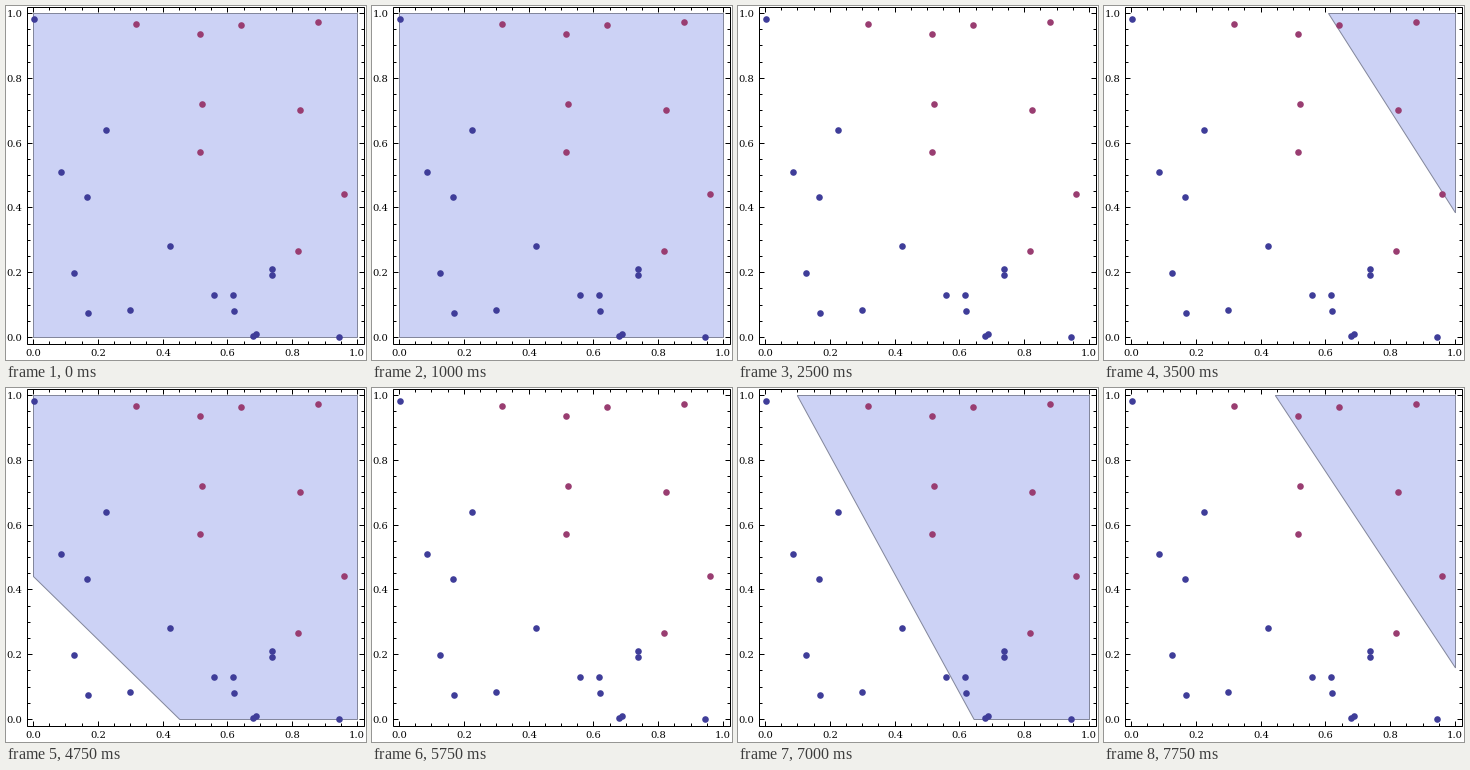
A matplotlib script that plays this animation: 360x354 px, repeating every 8000 ms.

```python
import numpy as np
import matplotlib.pyplot as plt
from matplotlib.animation import FuncAnimation
from matplotlib.patches import Polygon, Rectangle

W, H, DPI = 360, 354, 100
PX = 72 / DPI  # one pixel in points
X0, Y0, UNIT = 27.5, 331.5, 324
LEFT, TOP, RIGHT, BOTTOM = 21.5, 1.5, 358.5, 338.5

BLUE, RED = "#3f3d99", "#993d71"
FILL, EDGE = "#ccd2f5", "#83879c"

RED_POINTS = dict(
    a=(.315, .969), b=(.5154, .9353), c=(.639, .966), d=(.8796, .9723),
    e=(.5216, .7196), f=(.821, .7011), g=(.5154, .5716), h=(.9568, .4422),
    i=(.8179, .2666))
BLUE_POINTS = dict(
    A=(0, .9815), C=(.2253, .6394), D=(.0864, .51), E=(.1636, .433),
    F=(.1235, .1988), G=(.1667, .0755), H=(.2963, .0847), I=(.4228, .282),
    J=(.5586, .131), K=(.6142, .131), L=(.7346, .2111), M=(.7346, .1926),
    N=(.6852, .0108), O=(.679, .0046), P=(.9444, .0015), Q=(.6173, .0817))

# misclassified point that corrects the perceptron at each step
PICKS = "MbAdJfIgQAdChIbAePgCgAPbAbAgLhK"
START = np.array([.02, 0, 0])


def to_px(x, y):
    return X0 + UNIT * np.asarray(x), Y0 - UNIT * np.asarray(y)


def train():
    """Weights (wx, wy, bias) before and after every correction."""
    history = [START]
    for name in PICKS:
        if name in RED_POINTS:
            step = np.array([*RED_POINTS[name], 1])
        else:
            step = -np.array([*BLUE_POINTS[name], 1])
        history.append(history[-1] + step)
    return history


def positive_region(w):
    """Part of the unit square where wx*x + wy*y + bias >= 0."""
    square = np.array([(0, 0), (1, 0), (1, 1), (0, 1)], float)
    region = []
    for p, q in zip(square, np.roll(square, -1, axis=0)):
        fp, fq = w[:2] @ p + w[2], w[:2] @ q + w[2]
        if fp >= 0:
            region.append(p)
        if fp * fq < 0:
            region.append(p + (q - p) * fp / (fp - fq))
    return np.array(region)


fig = plt.figure(figsize=(W / DPI, H / DPI), dpi=DPI, facecolor="white")
ax = fig.add_axes([0, 0, 1, 1])
ax.set_xlim(0, W)
ax.set_ylim(H, 0)
ax.axis("off")


def line(xs, ys):
    ax.plot(xs, ys, color="black", lw=PX, solid_capstyle="butt", snap=False,
            zorder=3)


def draw_frame():
    ax.add_patch(Rectangle((LEFT, TOP), RIGHT - LEFT, BOTTOM - TOP, fill=False,
                           ec="black", lw=PX, snap=False, zorder=3))
    font = dict(family="DejaVu Serif", size=10 * PX, va="baseline")
    for k in range(21):
        # ticks sit on pixel centres so they stay crisp
        x, y = (np.floor(v) + .5 for v in to_px(k / 20, k / 20))
        size = 5 if k % 4 == 0 else 3
        line([x, x], [TOP, TOP + size])
        line([x, x], [BOTTOM, BOTTOM - size])
        line([LEFT, LEFT + size], [y, y])
        line([RIGHT, RIGHT - size], [y, y])
        if k % 4 == 0:
            label = f"{k / 20:.1f}"
            ax.text(x - .5, 350.3, label, ha="center", **font)
            ax.text(16.3, y + 3.4, label, ha="right", **font)


def draw_points(points, color):
    xs, ys = to_px(*np.array(list(points.values())).T)
    ax.plot(xs, ys, "o", color=color, ms=6.6 * PX, mew=0, snap=False, zorder=4)


region = Polygon([(0, 0), (1, 0), (1, 1)], closed=True, fc=FILL, ec=EDGE,
                 lw=PX, snap=False, zorder=1)
ax.add_patch(region)
draw_frame()
draw_points(BLUE_POINTS, BLUE)
draw_points(RED_POINTS, RED)

weights = train()


def update(k):
    corners = positive_region(weights[k])
    visible = len(corners) > 2
    region.set_visible(visible)
    if visible:
        region.set_xy(np.column_stack(to_px(*corners.T)))
    return [region]


anim = FuncAnimation(fig, update, frames=len(weights), interval=250,
                     repeat=True, repeat_delay=0, blit=False)
plt.show()
```
